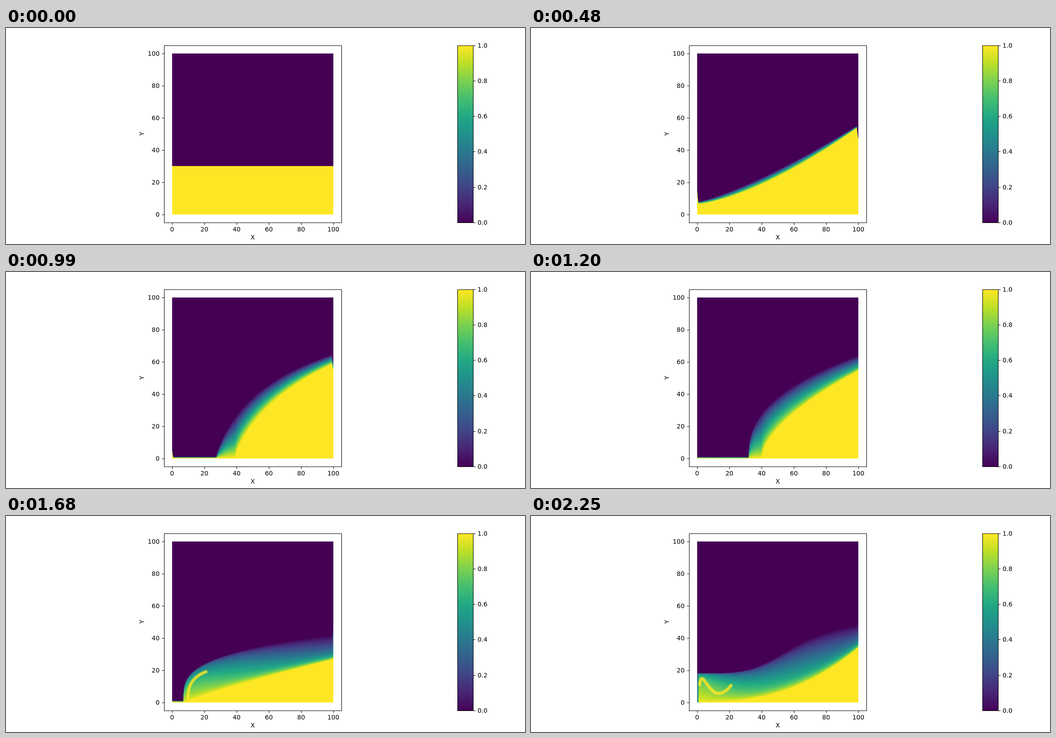
An HTML page with a canvas for the animation above (2.28 s loop, 1159x483 px).

```html
<!DOCTYPE html>
<html lang="en">
<head>
<meta charset="utf-8">
<title>Sloshing tank</title>
<style>
  html, body { margin: 0; width: 100%; height: 100%; overflow: hidden; background: #fff; }
  svg, canvas { position: absolute; left: 0; top: 0; display: block; }
  text { font: 13.89px "DejaVu Sans", sans-serif; fill: #000; }
  .line { fill: none; stroke: #000; stroke-width: 1.1; }
</style>
</head>
<body>
<canvas id="stage" width="1159" height="483"></canvas>
<svg id="axes" width="1159" height="483"></svg>
<script>
const LOOP = 2280, STEP = 30;
const SIZE = 360, SCALE = SIZE / 100, LEFT = 370.9, TOP = 56.64;

// A surface rises from the front to the right wall:
// front position, height before it, height at the wall, power, bulge
const POSES = [
  { t: 0,    upper: [0, 30, 30, 1.3, 0],      lower: [0, 30, 30, 1.5, 0] },
  { t: 480,  upper: [0, 7.8, 55.5, 1.27, 0],  lower: [0, 6.5, 54.3, 1.5, 0] },
  { t: 720,  upper: [15, 1.5, 65, 2, 3],      lower: [35, .8, 61.5, 1.3, 1.5] },
  { t: 1200, upper: [32, .8, 64, .4, 0],      lower: [40, .1, 54.5, .6, 0] },
  { t: 1680, upper: [7, .8, 42, .3, 0],       lower: [9, .1, 26.7, .85, 0] },
  { t: 2010, upper: [0, 20.5, 43, 4, 7.7],    lower: [0, .5, 30.5, 1.6, 0] },
  { t: 2250, upper: [0, 18, 48, 4, 6.8],      lower: [0, 0, 34, 2.5, 0] }
];
// Bezier points of the crest that folds over at the left wall
const CRESTS = [
  { t: 1680, curve: [10, 1, 9, 10, 13, 16, 21, 19] },
  { t: 2010, curve: [1.8, 14.5, 4, 25, 8, 8, 18, 14.5] },
  { t: 2250, curve: [1.6, 11, 3.5, 25, 8, -6, 21, 10.5] }
];
const MAP = ["440154", "482475", "414487", "355f8d", "2a788e", "21918c",
             "22a884", "44bf70", "7ad151", "bddf26", "fde725"]
  .map(h => [0, 2, 4].map(i => parseInt(h.slice(i, i + 2), 16)));

const clamp = v => Math.min(1, Math.max(0, v));
const mix = (a, b, u) => a + (b - a) * u;
const ease = (a, b, t) => { const u = clamp((t - a) / (b - a)); return u * u * (3 - 2 * u); };

function viridis(v) {
  const p = clamp(v) * 10, i = Math.min(9, Math.floor(p));
  return MAP[i].map((a, k) => Math.round(mix(a, MAP[i + 1][k], p - i)));
}
const COLORS = Array.from({ length: 256 }, (_, i) => viridis(i / 255));

// Monotone interpolation in time of each number under a key
function poseAt(poses, key, t) {
  const last = poses.length - 1;
  let i = 0;
  while (i < last - 1 && t >= poses[i + 1].t) i++;
  const span = poses[i + 1].t - poses[i].t, u = clamp((t - poses[i].t) / span);
  return poses[0][key].map((_, c) => {
    const rate = k => (poses[k + 1][key][c] - poses[k][key][c]) / (poses[k + 1].t - poses[k].t);
    const slope = k => {
      if (k === 0) return 0;
      if (k === last) return rate(k - 1);
      const a = rate(k - 1), b = rate(k);
      return a * b > 0 ? 2 * a * b / (a + b) : 0;
    };
    const u2 = u * u, u3 = u2 * u;
    return mix(poses[i][key][c], poses[i + 1][key][c], 3 * u2 - 2 * u3)
         + span * (slope(i) * (u3 - 2 * u2 + u) + slope(i + 1) * (u3 - u2));
  });
}

// Powers span a wide range, so they move on a log scale
for (const p of POSES) for (const s of [p.upper, p.lower]) s[3] = Math.log(s[3]);

function height([front, base, wall, logPower, bulge], x) {
  const w = clamp((x - front) / (100 - front)) ** Math.exp(logPower);
  return base + (wall - base) * w * (1 + bulge) / (1 + bulge * w);
}

const stage = document.getElementById("stage").getContext("2d");
const field = document.createElement("canvas");
field.width = field.height = SIZE;
const ctx = field.getContext("2d");
const image = ctx.createImageData(SIZE, SIZE);
image.data.fill(255);

function fillField(t) {
  const upper = poseAt(POSES, "upper", t), lower = poseAt(POSES, "lower", t);
  const blend = ease(900, 1600, t);
  const rim = ease(1780, 2010, t);
  const swing = 9 * Math.sin(Math.PI * t / 1200), drag = Math.max(0, swing);

  for (let i = 0; i < SIZE; i++) {
    const x = (i + .5) / SCALE;
    // fluid clings to the walls behind the swing
    const nearLeft = Math.max(0, 1 - x) ** 2, nearRight = Math.max(0, x - 99);
    const low = height(lower, x) + drag * (nearLeft - nearRight);
    const high = Math.max(low + .02, height(upper, x) + drag * nearLeft - swing * nearRight);
    // mixing leaves a plateau that is weaker and softer to the right
    const plateau = mix(1, .95 - .004 * x, blend);
    const power = mix(1, .15 + .009 * x, blend);
    const shade = 1 - .7 * rim * Math.max(0, 1 - x / 1.2);

    for (let j = 0; j < SIZE; j++) {
      const y = (SIZE - j - .5) / SCALE;
      const f = clamp((high - y) / (high - low));
      const v = f === 0 || f === 1 ? f : plateau * f ** power + (1 - plateau) * f ** 8;
      const color = COLORS[Math.round(255 * clamp(v * shade))];
      const at = 4 * (j * SIZE + i);
      for (let k = 0; k < 3; k++) image.data[at + k] = color[k];
    }
  }
  ctx.putImageData(image, 0, 0);
}

function drawCrest(t) {
  const strength = ease(1500, 1680, t);
  if (!strength) return;
  const p = poseAt(CRESTS, "curve", t).map((v, i) => i % 2 ? SIZE - v * SCALE : v * SCALE);
  ctx.lineCap = "round";
  ctx.strokeStyle = `rgba(${viridis(1)},${.36 * strength})`;
  for (let width = 8; width >= 2; width -= 1.5) {
    ctx.lineWidth = width;
    ctx.beginPath();
    ctx.moveTo(p[0], p[1]);
    ctx.bezierCurveTo(...p.slice(2));
    ctx.stroke();
  }
}

function draw(t) {
  fillField(t);
  drawCrest(t);
  stage.clearRect(0, 0, 1159, 483);
  stage.drawImage(field, LEFT, TOP);
}

function buildAxes() {
  const stops = MAP.map((c, i) => `<stop offset="${i * 10}%" stop-color="rgb(${c})"/>`).join("");
  const line = d => `<path class="line" d="${d}"/>`;
  const label = (x, y, anchor, s) => `<text x="${x}" y="${y}" text-anchor="${anchor}">${s}</text>`;
  let s = `<defs><linearGradient id="bar" x1="0" y1="1" x2="0" y2="0">${stops}</linearGradient></defs>
    <rect x="1008.5" y="39.5" width="35" height="396" fill="url(#bar)"/>`;
  s += line("M353.5 39.5h396v396h-396z") + line("M1008.5 39.5h35v396h-35z");
  for (let i = 0; i <= 5; i++) {
    const x = 371 + 72 * i, y = 417 - 72 * i, barY = Math.round(434.7 - 79.2 * i);
    s += line(`M${x + .5} 435.5v5`) + label(x, 455, "middle", 20 * i);
    s += line(`M353.5 ${y + .5}h-5`) + label(343, y + 5, "end", 20 * i);
    s += line(`M1043.5 ${barY + .5}h5`) + label(1053, barY + 5, "start", (i / 5).toFixed(1));
  }
  s += label(551, 473, "middle", "X");
  s += `<text transform="translate(308 236.5) rotate(-90)" text-anchor="middle">Y</text>`;
  document.getElementById("axes").innerHTML = s;
}

let shown = -1;
function tick() {
  const step = Math.floor(performance.now() % LOOP / STEP);
  if (step !== shown) draw((shown = step) * STEP);
  requestAnimationFrame(tick);
}

buildAxes();
tick();
</script>
</body>
</html>
```
